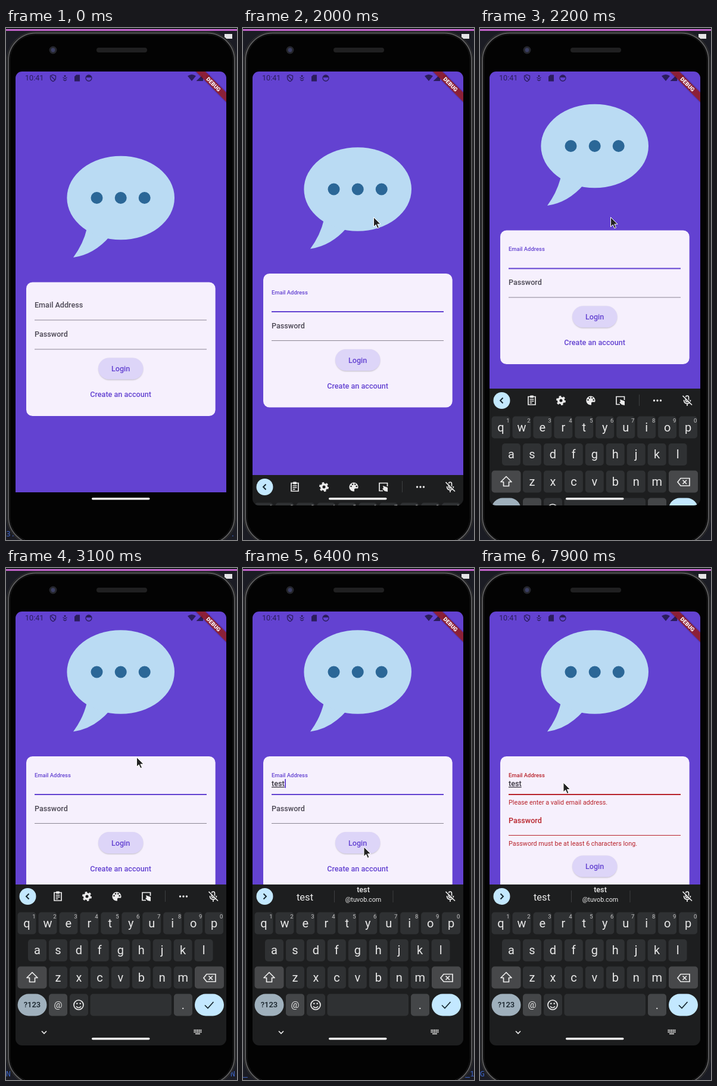
Recreate the animation shown at these times as an HTML page. Size 388 px wide and 859 px high, loop 8000 ms.

```html
<!DOCTYPE html>
<html lang="en">
<head>
<meta charset="utf-8">
<title>Login form</title>
<style>
html, body { margin: 0; width: 100%; height: 100%; overflow: hidden; background: #1b1c24; }
svg { display: block; font-family: Roboto, sans-serif; }
.m { font-weight: 500; }
.mid { text-anchor: middle; }
.term { font: 13px "Noto Sans Mono", monospace; fill: #4068cc; }
.err { font-size: 10.8px; fill: #b8232b; }
.ico { fill: none; stroke: #ececec; stroke-width: 1.7; }
.solid { fill: #ececec; stroke: none; }
.line { fill: none; stroke: #2b1d5c; stroke-width: 1.3; }
</style>
</head>
<body>
<svg width="388" height="859" viewBox="0 0 388 859">
  <defs>
    <clipPath id="screen"><rect x="16" y="73" width="354" height="728" rx="11"/></clipPath>
    <filter id="soft" x="-20%" y="-100%" width="140%" height="300%"><feGaussianBlur stdDeviation="1.2"/></filter>
  </defs>

  <!-- desktop behind the phone -->
  <rect width="388" height="859" fill="#1b1c24"/>
  <rect y="2" width="388" height="2.6" fill="#dc6ee4"/>
  <rect x="367" y="10" width="13" height="8" fill="#e4e4e6"/>
  <text id="termL" class="term" x="0" y="853"/>
  <text id="termR" class="term mid" x="381" y="853"/>

  <!-- phone body -->
  <rect x="1" y="6" width="386" height="862" rx="49" fill="#19191a" stroke="#363638"/>
  <rect x="4" y="8.5" width="380" height="857" rx="46" fill="#030303" stroke="#5c5c5e" stroke-width="2"/>
  <rect x="6.5" y="11" width="375" height="852" rx="43" fill="none" stroke="#1c1c1d"/>
  <circle cx="79" cy="37" r="6.5" fill="#25262c"/>
  <circle cx="79" cy="37" r="3.4" fill="#3b3f63"/>
  <rect x="152" y="33" width="85" height="8" rx="4" fill="#202021"/>

  <g clip-path="url(#screen)">
    <rect x="16" y="73" width="354" height="706" fill="#6342d1"/>

    <g id="form">
      <path d="M136 336Q130 362 113 385Q148 380 174 350Z" fill="#badbf3"/>
      <ellipse cx="192.7" cy="285" rx="90.3" ry="70.3" fill="#badbf3"/>
      <g fill="#2b6797">
        <circle cx="152.5" cy="285" r="10"/><circle cx="192.7" cy="285" r="10"/><circle cx="232.7" cy="285" r="10"/>
      </g>
      <rect id="card" x="34" y="426.5" width="317.7" height="224.5" rx="10.5" fill="#f6f0fd"/>
      <text id="mail" class="m" font-size="12.6">Email Address</text>
      <text id="typed" class="m" x="48" y="476.5" font-size="12.6" fill="#37333d" text-decoration="underline"/>
      <rect id="caret" y="464.5" width="1.8" height="15" fill="#6342d1"/>
      <rect id="mailLine" x="48" width="289"/>
      <text id="mailErr" class="err" x="48" y="507.3">Please enter a valid email address.</text>
      <g id="pass">
        <text class="m" x="48" y="518" font-size="12.6">Password</text>
        <rect x="48" y="538.5" width="289" height="1"/>
      </g>
      <text id="passErr" class="err" x="48" y="576.6">Password must be at least 6 characters long.</text>
      <g id="buttons" class="m mid" font-size="12.6" fill="#6342d1">
        <rect x="155.5" y="554.5" width="74.5" height="36" rx="18" fill="#000" opacity=".22" filter="url(#soft)"/>
        <rect x="155" y="553.5" width="75.5" height="36" rx="18" fill="#ddd5f8"/>
        <text x="192.6" y="576.3">Login</text>
        <text x="192.6" y="619.3">Create an account</text>
      </g>
    </g>

    <!-- status bar -->
    <g fill="#2b1d5c">
      <text x="32" y="88.4" font-size="12.6">10:41</text>
      <path class="line" d="M79 78.5l4.5 1.8v3.5q0 4-4.5 5.8q-4.5-1.8-4.5-5.8v-3.5zM76 81l6.5 6.5"/>
      <path class="line" d="M95.5 83l3.5 2 3.5-2M96 86.5l3 2 3-2"/>
      <circle cx="99" cy="80.5" r="1.6"/>
      <path d="M118 78.5h6v11h-9v-8z"/>
      <circle class="line" cx="139" cy="84" r="5"/>
      <path d="M135 83a4 4 0 0 1 8 0z"/>
      <path d="M305 80.5q7-5 14 0l-7 8.5z"/>
      <path d="M320 89v-.5l11-10.5v11z"/>
      <rect x="336" y="79" width="6" height="10"/>
    </g>

    <g transform="translate(370 73) rotate(45)">
      <rect x="-40" y="25" width="80" height="11" fill="#000" opacity=".5" filter="url(#soft)"/>
      <rect x="-40" y="25" width="80" height="11" fill="#a0202e" opacity=".82"/>
      <text class="mid" y="33.6" font-size="9.2" font-weight="900" fill="#fff">DEBUG</text>
    </g>

    <!-- keyboard, drawn from its own top edge -->
    <g id="kb">
      <rect x="16" width="354" height="290" fill="#1d1e1f"/>
      <circle cx="36.5" cy="20" r="14" fill="#c3e8ff"/>
      <path id="chev" fill="none" stroke="#13232d" stroke-width="1.9"/>
      <g id="tools" class="ico">
        <path d="M81 13.5h12v13.5h-12zM83.500 18h7M83.5 21h7M83.5 24h4"/>
        <rect class="solid" x="84" y="11.5" width="6" height="4" rx="1"/>
        <circle cx="136" cy="20" r="4.3" stroke-width="3.6"/>
        <circle cx="136" cy="20" r="6.7" stroke-width="2.6" stroke-dasharray="3.5 3.516"/>
        <circle class="solid" cx="186" cy="20" r="7.6"/>
        <g fill="#1d1e1f" stroke="none">
          <circle cx="181.5" cy="19" r="1.3"/><circle cx="184" cy="15.5" r="1.3"/>
          <circle cx="188.3" cy="15.5" r="1.3"/><circle cx="190.7" cy="19" r="1.3"/>
          <path d="M187 28v-4q0-1.5 2-1.5h5v6z"/>
        </g>
        <path d="M242.5 19v-5.5h-13.5v13h6"/>
        <path class="solid" d="M235 18l8 3v7l-5-1-4-4 2-1z"/>
        <path d="M267.5 10v19" stroke="#3d3f41" stroke-width="1"/>
        <g class="solid"><circle cx="292.5" cy="20" r="1.7"/><circle cx="298" cy="20" r="1.7"/><circle cx="303.5" cy="20" r="1.7"/></g>
      </g>
      <g id="sugg" class="mid" fill="#ececec">
        <path d="M153.5 10v20M252 10v20" stroke="#3d3f41"/>
        <text id="word" x="104" y="26.5" font-size="16.5"/>
        <text id="word2" class="m" x="202" y="13.3" font-size="12.6"/>
        <text x="202" y="28.7" font-size="10.8">@tuvob.com</text>
      </g>
      <g class="ico">
        <rect x="345.5" y="12" width="5" height="10" rx="2.5"/>
        <path d="M342.5 19q0 6 5.5 6t5.5-6M348 25v4"/>
        <path d="M342 12l15 15" stroke="#1d1e1f" stroke-width="2"/>
        <path d="M340.5 12l15.500 15.5"/>
      </g>
      <g id="keys"></g>
      <g class="ico">
        <path d="M44 147.5l-9 9h4.5v7h9v-7h4.5z" stroke-linejoin="round"/>
        <path d="M337 150.5h15v12.5h-15l-5-6.25zM340.5 153.5l6.5 6.5M347 153.5l-6.5 6.5"/>
        <circle cx="122" cy="202" r="8"/>
        <path d="M118 204.5q4 4.5 8 0"/>
        <circle class="solid" cx="119.3" cy="199.7" r="1.3"/><circle class="solid" cx="124.7" cy="199.7" r="1.3"/>
        <path d="M334 202.5l5 5 9.5-10.5" stroke="#13232d"/>
        <path d="M60 246l4 4 4-4"/>
        <path d="M315.5 244.5h13M315.5 247.5h13" stroke-width="2" stroke-dasharray="2 .75"/>
        <path d="M318 250.5h8"/>
      </g>
    </g>
    <rect x="144" y="788" width="97.5" height="3.6" rx="1.8" fill="#fff"/>
  </g>

  <path id="mouse" d="M0 0v16l3.7-3.5 2.6 6 2.7-1.1-2.6-5.8h5.2z" fill="#232323" stroke="#fff"/>
</svg>
<script>
const $ = id => document.getElementById(id);
const DARK = '#4b4753', MAIN = '#6342d1', RED = '#b8232b';

// keyboard
let keys = '';
function key(x, y, w, label = '', fill = '#2f3133', size = 20, rx = 5, ink = '#e8e8e8', cls = '') {
  keys += `<rect x="${x}" y="${y}" width="${w}" height="37" rx="${rx}" fill="${fill}"/>` +
    `<text class="mid ${cls}" x="${x + w / 2}" y="${y + 18.5 + size * .33}" font-size="${size}" fill="${ink}">${label}</text>`;
}
function row(letters, x, y) {
  [...letters].forEach((c, i) => key(x + i * 34.95, y, 31, c));
}
row('qwertyuiop', 19.5, 46.5);
[...'1234567890'].forEach((d, i) =>
  keys += `<text class="mid" x="${47 + i * 34.95}" y="57" font-size="9.5" fill="#c8c8c8">${d}</text>`);
row('asdfghjkl', 37, 92);
row('zxcvbnm', 72, 137.5);
key(19.5, 137.5, 49, '', '#47484a');
key(317, 137.5, 49, '', '#47484a');
key(19.5, 183.5, 49, '?123', '#9fb0bc', 13, 18.5, '#16222a', 'm');
key(72, 183.5, 31, '@', '#444648', 15.5);
key(107, 183.5, 31);
key(141.5, 183.5, 136.5);
key(282, 183.5, 31, '.', '#444648');
key(317, 183.5, 49, '', '#c3e8ff', 20, 18.5);
$('keys').innerHTML = keys;

// [time, value...] lists
const mouseKeys = [[400, 372, 412], [1200, 146, 480], [1400, 146, 480], [1800, 219.5, 317.5],
  [5900, 219.5, 317.5], [6400, 203, 468], [6600, 203, 468], [7000, 294, 437], [7500, 294, 437], [7900, 140, 360]];
const kbKeys = [[0, 801], [2000, 750], [2100, 684], [2200, 605], [2300, 550], [2400, 531]];
const typing = [[0, ''], [3900, 't'], [4000, 'te'], [4200, 'tes'], [4300, 'test']];
const caretKeys = [[0, 0], [1500, 1], [2000, 0], [2400, 1], [2800, 0], [3400, 1]];
const terminal = [[0, '3.', '.'], [1400, '', ''], [3100, 'N', ' N'], [3400, '', ''],
  [5300, '_', '_1'], [6600, 'ZE', ''], [7600, 'G', '']];

const clamp = v => Math.max(0, Math.min(1, v));
const at = (list, t) => list.filter(k => k[0] <= t).pop();
const set = (el, attrs) => { for (const a in attrs) el.setAttribute(a, attrs[a]); };
const show = (el, on) => el.style.display = on ? '' : 'none';
const shift = (el, y) => set(el, { transform: `translate(0 ${y})` });

function path(list, t) {
  const a = at(list, t) || list[0], b = list[list.indexOf(a) + 1] || a;
  const p = a === b ? 0 : (t - a[0]) / (b[0] - a[0]), e = p * p * (3 - 2 * p);
  return [a[1] + (b[1] - a[1]) * e, a[2] + (b[2] - a[2]) * e];
}

function draw(t) {
  const top = at(kbKeys, t)[1], text = at(typing, t)[1];
  const focus = clamp((t - 1300) / 200), bad = t >= 6600;
  const fade = clamp((t - 6500) / 200), tint = bad ? RED : focus ? MAIN : DARK;

  shift($('kb'), top);
  shift($('form'), -Math.min(110.5, Math.max(0, (779 - top) / 2)));
  set($('card'), { height: bad ? 264 : 224.5 });
  shift($('pass'), bad ? 20 : 0);
  shift($('buttons'), bad ? 39.5 : 0);
  set($('pass').children[0], { fill: bad ? RED : DARK });
  set($('pass').children[1], { fill: bad ? RED : '#8b8693' });

  set($('mail'), { fill: tint, transform: `translate(48 ${469 - 8 * focus}) scale(${1 - focus / 4})` });
  set($('mailLine'), { fill: bad || focus ? tint : '#8b8693', y: 489.5, height: focus ? 2 : 1 });
  for (const id of ['mailErr', 'passErr']) {
    show($(id), bad);
    set($(id), { opacity: fade });
  }

  $('typed').textContent = text;
  const blink = t < 3900 ? at(caretKeys, t)[1] : t < 4300 || (t - 300) % 1000 < 500;
  show($('caret'), blink);
  set($('caret'), { x: 48 + (text ? $('typed').getComputedTextLength() + .5 : 0) });

  show($('tools'), !text);
  show($('sugg'), text);
  $('word').textContent = $('word2').textContent = text;
  set($('chev'), { d: text ? 'M34.5 15.5l4.5 4.5-4.5 4.5' : 'M38.5 15.5l-4.5 4.5 4.5 4.5' });

  const [, left, right] = at(terminal, t);
  $('termL').textContent = left;
  $('termR').textContent = right;

  show($('mouse'), t >= 500);
  set($('mouse'), { transform: `translate(${path(mouseKeys, t)})` });
}

function tick() {
  draw(Math.floor(performance.now() % 8000 / 100) * 100);
  requestAnimationFrame(tick);
}
tick();
</script>
</body>
</html>
```
